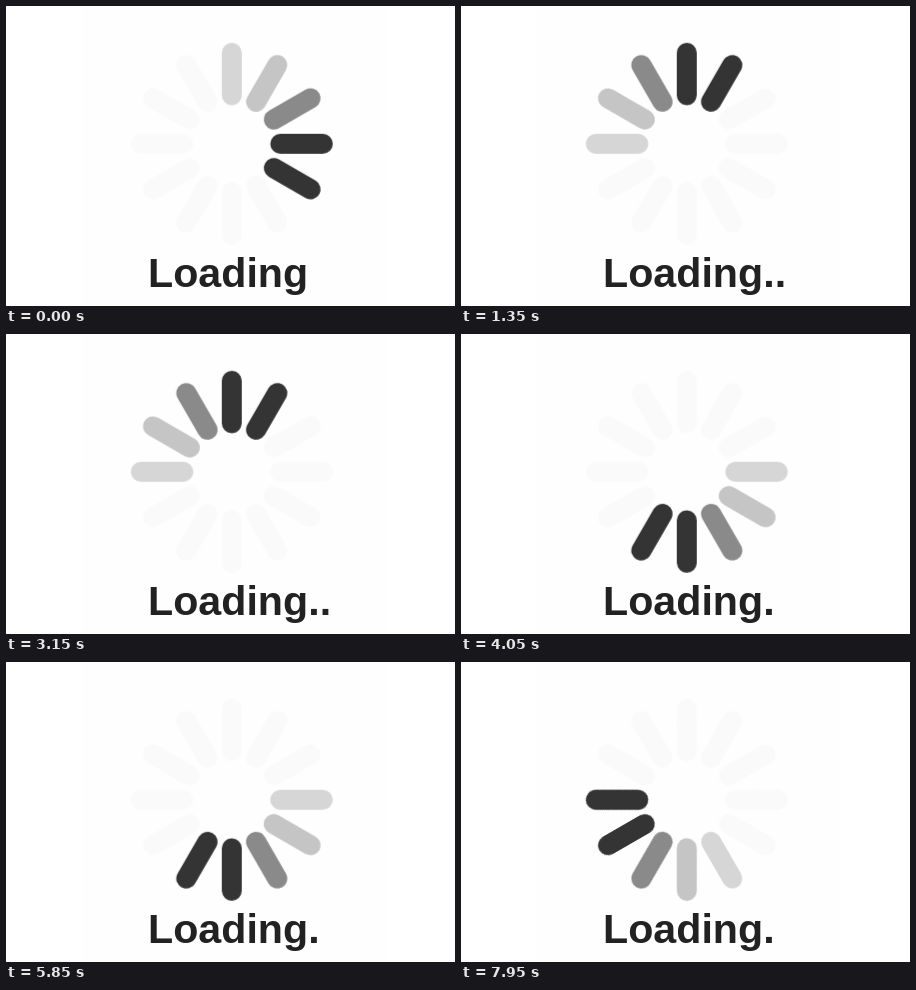
Animation, 449 px wide and 300 px high, one loop 8000 ms. Source, as an HTML page without scripts:

```html
<!DOCTYPE html>
<html lang="en">
<head>
<meta charset="utf-8">
<title>Loading</title>
<style>
html, body { margin: 0; width: 100%; height: 100%; overflow: hidden; background: #fff; }
svg { display: block; width: 449px; height: 300px; }

.wheel {
  stroke: #fafafa;
  stroke-width: 20;
  stroke-linecap: round;
  transform-origin: 0 0;
  animation: turn 8s infinite;
}
text { font: bold 41.2px "Liberation Sans", Arial, sans-serif; fill: #222; }
.dot { animation: 8s step-end infinite; }
.one { animation-name: one; }
.two { animation-name: two; }
.three { animation-name: three; }

/* one 30deg tick every 150ms */
@keyframes turn {
  0% { transform: rotate(0deg); animation-timing-function: steps(53, end); }
  99.375%, 100% { transform: rotate(1590deg); }
}
/* dots restart every 12 ticks (22.5%) */
@keyframes one {
  0%, 22.5%, 45%, 67.5%, 90% { opacity: 0; }
  5.625%, 28.125%, 50.625%, 73.125%, 95.625%, 100% { opacity: 1; }
}
@keyframes two {
  0%, 22.5%, 45%, 67.5%, 90%, 100% { opacity: 0; }
  11.25%, 33.75%, 56.25%, 78.75% { opacity: 1; }
}
@keyframes three {
  0%, 22.5%, 45%, 67.5%, 90%, 100% { opacity: 0; }
  18.75%, 41.25%, 63.75%, 86.25% { opacity: 1; }
}
</style>
</head>
<body>
<svg viewBox="0 0 449 300">
  <defs><path id="bar" d="M0-48.5V-91"/></defs>
  <rect x="76" width="304" height="300" fill="#fdfefd"/>
  <g transform="translate(225.8 137.8)">
    <g class="wheel">
      <use href="#bar" stroke="#d6d6d6"/>
      <use href="#bar" transform="rotate(30)" stroke="#c5c5c5"/>
      <use href="#bar" transform="rotate(60)" stroke="#8a8a8a"/>
      <use href="#bar" transform="rotate(90)" stroke="#343434"/>
      <use href="#bar" transform="rotate(120)" stroke="#343434"/>
      <use href="#bar" transform="rotate(150)"/>
      <use href="#bar" transform="rotate(180)"/>
      <use href="#bar" transform="rotate(210)"/>
      <use href="#bar" transform="rotate(240)"/>
      <use href="#bar" transform="rotate(270)"/>
      <use href="#bar" transform="rotate(300)"/>
      <use href="#bar" transform="rotate(330)"/>
    </g>
  </g>
  <text x="142" y="281">Loading</text>
  <text class="dot one" x="302.3" y="281">.</text>
  <text class="dot two" x="313.8" y="281">.</text>
  <text class="dot three" x="324.8" y="281">.</text>
</svg>
</body>
</html>
```
